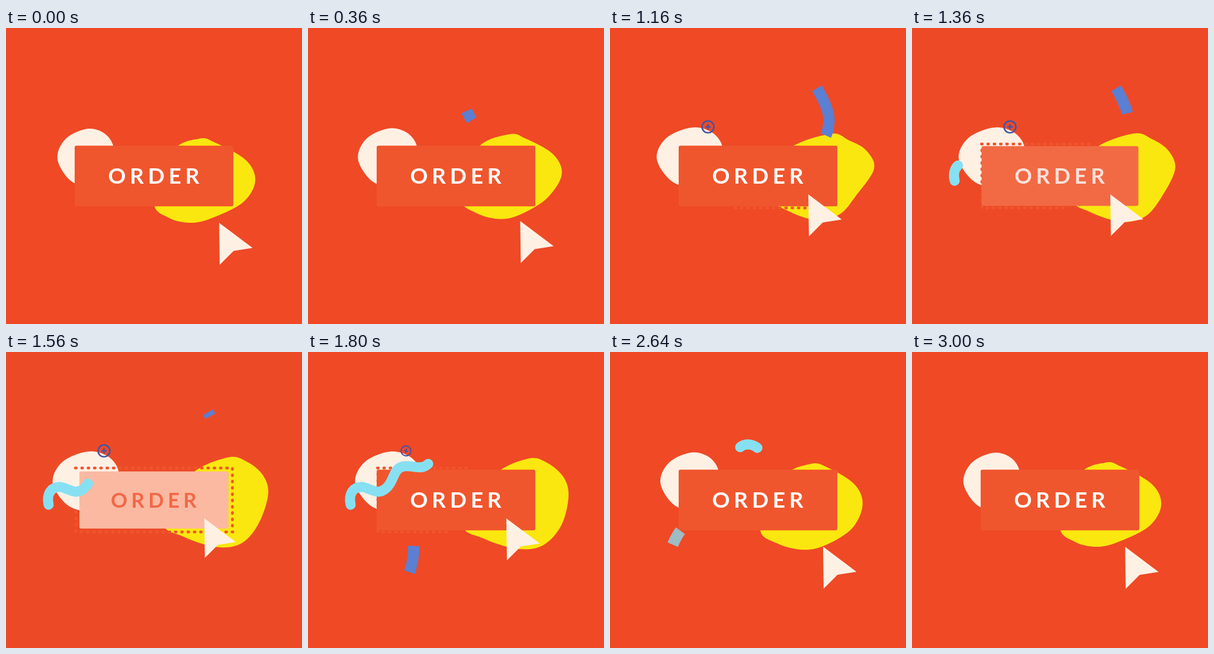
These frames come from a looping animation (500x500 px, 3.04 s). An HTML page with a canvas:

```html
<!DOCTYPE html>
<html lang="en">
<head>
<meta charset="utf-8">
<title>Order button</title>
<style>
html, body { margin: 0; width: 100%; height: 100%; overflow: hidden; background: #ef4926; }
canvas { display: block; }
</style>
</head>
<body>
<canvas id="stage" width="500" height="500"></canvas>
<script>
const ctx = document.getElementById('stage').getContext('2d');
const LOOP = 3040, STEP = 40;
const ORANGE = [240, 86, 45], WHITE = [255, 255, 255], CREAM = '#fff0e4';
const BLUE = [91, 127, 210], GREY_BLUE = [159, 187, 196];

const lerp = (a, b, u) => a + (b - a) * u;
const mix = (a, b, u) => a.map((v, i) => lerp(v, b[i], u));
const rgb = (a, b = a, u = 0) => `rgb(${mix(a, b, u).map(Math.round)})`;
const ramp = (t, from, to) => Math.max(0, Math.min(1, (t - from) / (to - from)));
const cubic = u => u < .5 ? 4 * u ** 3 : 1 - 4 * (1 - u) ** 3;
const ease = (t, from, to) => cubic(ramp(t, from, to));

// Draws in a local frame with its origin at x, y
function at(x, y, sx, sy, paint) {
  ctx.save();
  ctx.translate(x, y);
  ctx.scale(sx, sy);
  paint();
  ctx.restore();
}

// Closed smooth curve through a flat list of points
function blob(p, color) {
  const n = p.length / 2;
  const x = i => p[(i + n) % n * 2], y = i => p[(i + n) % n * 2 + 1];
  ctx.beginPath();
  ctx.moveTo(x(0), y(0));
  for (let i = 0; i < n; i++)
    ctx.bezierCurveTo(
      x(i) + (x(i + 1) - x(i - 1)) / 6, y(i) + (y(i + 1) - y(i - 1)) / 6,
      x(i + 1) - (x(i + 2) - x(i)) / 6, y(i + 1) - (y(i + 2) - y(i)) / 6,
      x(i + 1), y(i + 1));
  ctx.fillStyle = color;
  ctx.fill();
}

const rest = [282,208, 326,187, 352,193, 405,223, 421,258, 401,294, 353,319, 315,329, 276,321, 250,293];
const stretched = [295,210, 371,179, 404,190, 433,207, 446,238, 415,284, 389,314, 352,325, 303,310, 275,285];
const round = [316,208, 375,178, 408,184, 434,208, 442,240, 431,290, 402,325, 358,331, 300,313, 264,288];
const pebble = [87,222, 101,187, 140,170, 172,183, 181,215, 150,262, 112,260];

const upperRibbon = new Path2D('M268 140C275 155 285 168 298.5 180.5C320 203 375 220 381 162C384 146 373 122 361 101.5');
const lowerRibbon = new Path2D('M171.5 372Q179 350 178.5 328C180 310 182 299 176 293C150 267 122 287 106 325.5');
const wave = new Path2D('M72 258C68 240 76 227 92 228C108 231 117 243 132 230C146 219 143 196 162 193C178 191 190 200 202 190C213 180 212 157 232 156C239 156 244 158 249 162');

// Part of a path between two lengths
function trim(path, from, to, color, width, cap) {
  if (to <= from) return;
  ctx.setLineDash([to - from, 999]);
  ctx.lineDashOffset = -from;
  ctx.strokeStyle = color;
  ctx.lineWidth = width;
  ctx.lineCap = cap;
  ctx.stroke(path);
  ctx.setLineDash([]);
}

// Lifts on the way out and dips on the way back
function yellow(t) {
  const out = ramp(t, 0, 1160), swell = ramp(t, 1160, 1680), back = ramp(t, 1680, 3000);
  const shape = mix(mix(mix(rest, stretched, out), round, swell), rest, back);
  const bob = 6 * (Math.sin(Math.PI * back) - Math.sin(Math.PI * out));
  at(0, bob, 1, 1, () => blob(shape, '#fae70f'));
}

function cream(t) {
  const grow = ramp(t, 0, 1160) - ramp(t, 1700, 2900);
  at(133, 222, 1 + .17 * grow, 1 + .04 * grow, () => {
    ctx.translate(-133, -222);
    blob(pebble, CREAM);
  });
}

function ribbons(t) {
  at(-20 * ramp(t, 680, 1520), 0, 1, 1, () =>
    trim(upperRibbon, 227 * ramp(t, 420, 1600), 227 * ramp(t, 320, 826), rgb(BLUE), 19, 'butt'));
  trim(lowerRibbon, 180 * ramp(t, 2050, 2765), 180 * ramp(t, 1640, 2280),
    rgb(BLUE, GREY_BLUE, ramp(t, 2200, 2360)), 19, 'butt');
}

function plus(t) {
  const grow = ease(t, 360, 1000), fade = ease(t, 1500, 2360);
  const size = grow - fade;
  if (size <= 0) return;
  at(165.5, 167, size, size, () => {
    ctx.rotate(1.6 * (grow - 1 + fade));
    ctx.beginPath();
    ctx.arc(0, 0, 10, 0, 7);
    ctx.moveTo(-4.5, 0); ctx.lineTo(4.5, 0);
    ctx.moveTo(0, -4.5); ctx.lineTo(0, 4.5);
    ctx.strokeStyle = '#4454a5';
    ctx.lineWidth = 2.6;
    ctx.lineCap = 'butt';
    ctx.stroke();
  });
}

// Dots run clockwise from the lower right corner
function dots(t) {
  const w = 264.5, h = 108, total = 2 * (w + h), count = 70;
  const from = 33 + 1257 * ease(t, 977, 2423);
  const to = 33 + 1257 * ease(t, 800, 1990);
  ctx.fillStyle = rgb(ORANGE);
  for (let i = 0; i < count; i++) {
    const s = i * total / count;
    if (((s - from) % total + total) % total >= to - from) continue;
    const far = s >= w + h, d = s % (w + h), side = d >= w;
    const x = Math.min(d, w), y = Math.max(d - w, 0);
    ctx.beginPath();
    ctx.ellipse(far ? 118 + x : 382.5 - x, far ? 196 + y : 304 - y,
      side ? 2.4 : 3, side ? 3 : 2.4, 0, 0, 7);
    ctx.fill();
  }
}

function button(press) {
  const size = 1 - .06 * press;
  at(250, 250, size, size, () => {
    ctx.beginPath();
    ctx.roundRect(-134, -51.2, 268, 102.4, 3);
    ctx.fillStyle = rgb(ORANGE, [251, 185, 162], press);
    ctx.fill();
    ctx.font = '700 37px Lato, sans-serif';
    ctx.letterSpacing = '6.8px';
    ctx.fillStyle = rgb(WHITE, [242, 104, 70], press);
    ctx.fillText('ORDER', -77.6, 13.3);
  });
}

function cursor(t, press) {
  const u = ease(t, 110, 1110) - ease(t, 1725, 2745);
  const size = 1 - .06 * press;
  at(lerp(360, 335, u), lerp(329, 281, u), size, size, () => {
    ctx.beginPath();
    ctx.moveTo(0, 0);
    ctx.lineTo(56.5, 42.5);
    ctx.lineTo(24.5, 47.5);
    ctx.lineTo(1, 71);
    ctx.fillStyle = CREAM;
    ctx.fill();
  });
}

function draw(t) {
  const press = ramp(t, 1320, 1520) - ramp(t, 1600, 1760);
  ctx.fillStyle = rgb([239, 73, 38], [236, 74, 39], press);
  ctx.fillRect(0, 0, 500, 500);
  yellow(t);
  cream(t);
  ribbons(t);
  plus(t);
  dots(t);
  button(press);
  trim(wave, 245 * ramp(t, 1900, 2760), 245 * ramp(t, 1279, 1996), '#87e0f2', 17, 'round');
  cursor(t, press);
}

function tick() {
  const t = performance.now() % LOOP;
  draw(Math.floor(t / STEP) * STEP);
  requestAnimationFrame(tick);
}
tick();
</script>
</body>
</html>
```
